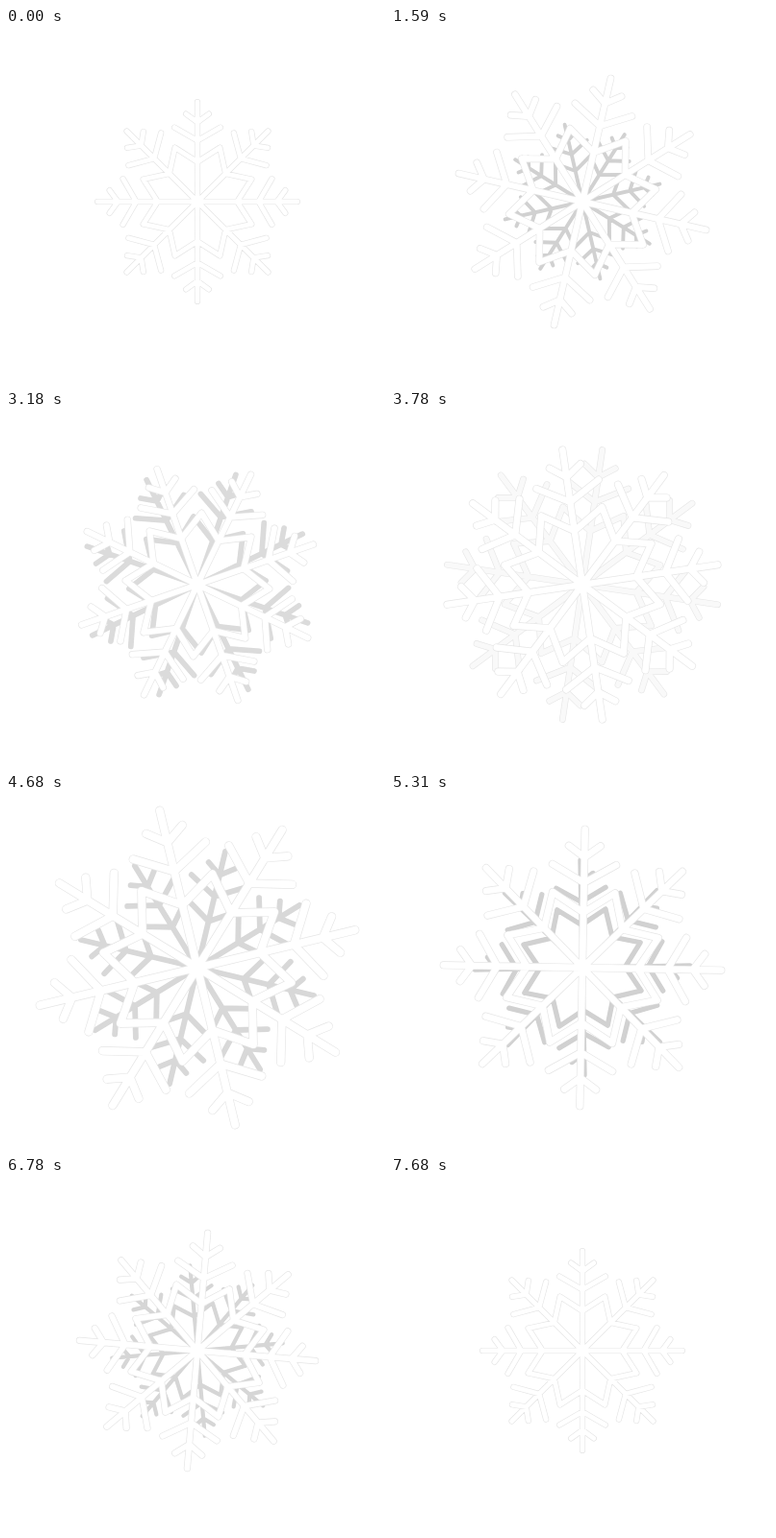
Recreate the animation shown at these times as an HTML page with a canvas. Size 394 by 370 pixels, loop 7710 ms.

```html
<!DOCTYPE html>
<html lang="en">
<head>
<meta charset="utf-8">
<title>Snowflakes</title>
<style>
  html, body { margin: 0; width: 100%; height: 100%; overflow: hidden; background: #fff; }
  canvas { display: block; }
</style>
</head>
<body>
<canvas id="stage" width="394" height="370"></canvas>
<script>
const ctx = document.getElementById('stage').getContext('2d');
const LOOP = 7710, STEP = 30, TURN = 129, LAST = 256;
const CX = 199, CY = 181;
const WIDTH = 0.046;
const REST = 106, SWELL = 46, SWELL_AT = 4290, SWELL_SPAN = 1250;

// Unit flake: eight arms with two pairs of twigs, plus an inner star
function makeFlake() {
  const flake = new Path2D(), arm = new Path2D();
  arm.moveTo(0, 0);
  arm.lineTo(0, -0.98);
  const vee = (root, x, y) => {
    arm.moveTo(-x, -y);
    arm.lineTo(0, -root);
    arm.lineTo(x, -y);
  };
  vee(0.78, 0.112, 0.862);
  vee(0.6, 0.225, 0.73);
  const a = Math.PI / 8;
  vee(0.39, 0.575 * Math.sin(a), 0.575 * Math.cos(a));
  for (let i = 0; i < 8; i++) flake.addPath(arm, new DOMMatrix().rotate(i * 45));
  return flake;
}
const flake = makeFlake();

// The edge is a grey rim of the given width; fill goes on top
function drawFlake(size, angle, tone, rimWidth, fillWidth) {
  ctx.save();
  ctx.translate(CX, CY);
  ctx.rotate(angle * Math.PI / 180);
  ctx.scale(size, size);
  ctx.lineCap = ctx.lineJoin = 'round';
  const pass = (grey, width) => {
    ctx.strokeStyle = `rgb(${grey},${grey},${grey})`;
    ctx.lineWidth = width;
    ctx.stroke(flake);
  };
  pass(Math.min(tone, 229), rimWidth);
  pass(tone, fillWidth);
  ctx.restore();
}

function draw(now) {
  const n = Math.floor((now % LOOP) / STEP);
  const first = n < TURN;
  const u = first ? n / TURN : (n - TURN) / (LAST - TURN);
  const wave = Math.sin(Math.PI * u), ripple = Math.sin(2 * Math.PI * u);

  // Both flakes swell together while the front one gains on the back one
  const mean = REST + SWELL * Math.exp(-(((n * STEP - SWELL_AT) / SWELL_SPAN) ** 2));
  const [a, b] = first ? [0.31, -0.0775] : [0.08, 0.14];
  const gain = 1 + a * wave ** 2 + b * ripple ** 2;
  const tone = Math.round(255 - 46 * wave * (2 - wave));

  ctx.fillStyle = '#fff';
  ctx.fillRect(0, 0, 394, 370);
  const back = mean / gain, front = mean * gain;
  drawFlake(back, -360 * u, tone, WIDTH, WIDTH - 1.2 / back);
  drawFlake(front, 360 * u, 255, WIDTH + 1.3 / front, WIDTH);
}

const start = performance.now();
function tick() {
  draw(performance.now() - start);
  requestAnimationFrame(tick);
}
tick();
</script>
</body>
</html>
```
